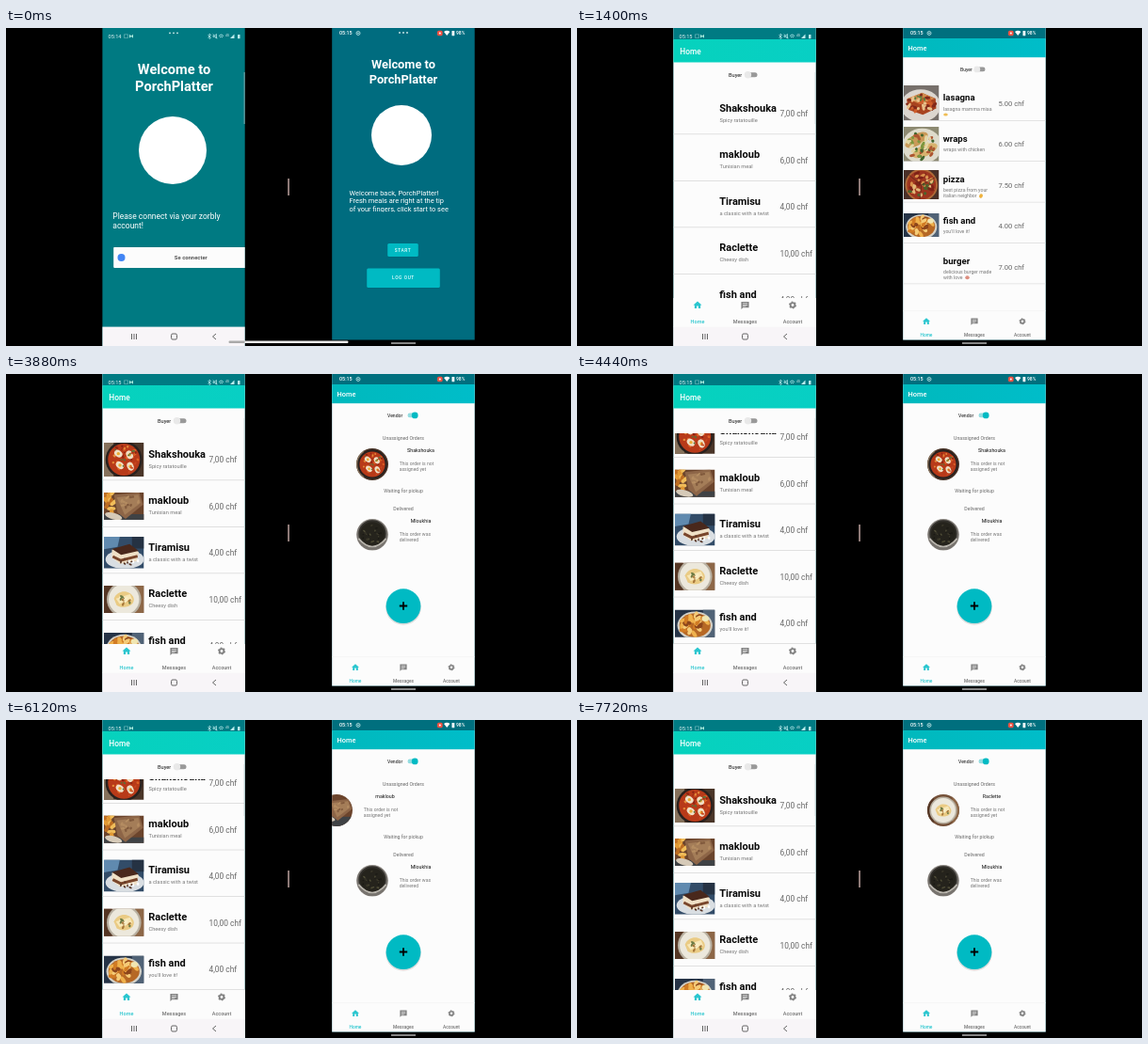
An HTML page for the animation above (8000 ms loop, 600 by 338 pixels).

```html
<!DOCTYPE html>
<html lang="en">
<head>
<meta charset="utf-8">
<title>Two phones</title>
<style>
  html, body { margin: 0; width: 100%; height: 100%; overflow: hidden; background: #000; }
  svg { display: block; width: 100vw; height: 100vh; font-family: Roboto, "Noto Sans", sans-serif; }
</style>
</head>
<body>
<svg id="stage" viewBox="0 0 600 338"></svg>
<script>
const LOOP = 8000;
const BOLD = 'font-weight="700"', MED = 'font-weight="500"', MID = 'text-anchor="middle"';

// y is the middle of the capitals
const text = (x, y, s, size, fill = '#fff', more = '') =>
  `<text x="${x}" y="${y + size * 0.355}" font-size="${size}" fill="${fill}" ${more}>${s}</text>`;
const rect = (x, y, w, h, fill, more = '') =>
  `<rect x="${x}" y="${y}" width="${w}" height="${h}" fill="${fill}" ${more}/>`;
const disc = (x, y, r, fill, more = '') =>
  `<circle cx="${x}" cy="${y}" r="${r}" fill="${fill}" ${more}/>`;
const oval = (x, y, rx, ry, fill, turn = 0) =>
  `<ellipse cx="${x}" cy="${y}" rx="${rx}" ry="${ry}" fill="${fill}" transform="rotate(${turn} ${x} ${y})"/>`;
const path = (d, fill, more = '') => `<path d="${d}" fill="${fill}" ${more}/>`;
const line = (d, color, w = 0.8) => path(d, 'none', `stroke="${color}" stroke-width="${w}"`);
const group = (id, body, more = '') => `<g id="${id}" ${more}>${body}</g>`;
const photo = (dish, x, y, w, h) =>
  `<use href="#${dish}" x="${x}" y="${y}" width="${w}" height="${h}"/>`;

let seed = 7;
const rnd = () => (seed = (seed * 16807) % 2147483647) / 2147483647;
function crumbs(n, x, y, rx, ry, colors, size = 4) {
  let s = '';
  for (let i = 0; i < n; i++) {
    const a = rnd() * 6.28, d = Math.sqrt(rnd());
    s += oval((x + Math.cos(a) * d * rx).toFixed(1), (y + Math.sin(a) * d * ry).toFixed(1),
      (size * (0.6 + rnd())).toFixed(1), (size * 0.7).toFixed(1), colors[i % colors.length], Math.round(rnd() * 180));
  }
  return s;
}

const dishes = {
  shakshouka: rect(0, 0, 100, 100, '#4a3528') + rect(0, 0, 24, 100, '#85715b') + disc(50, 50, 46, '#29211e') +
    disc(50, 50, 40, '#b83a19') + crumbs(26, 50, 50, 36, 36, ['#dd6225', '#8e2412', '#e58b39']) +
    [[36, 35], [64, 38], [40, 64], [66, 67]].map(([x, y]) => oval(x, y, 11, 8, '#f0dfc6', x) + disc(x, y, 4, '#edab33')).join('') +
    crumbs(14, 50, 50, 34, 34, ['#577238', '#c9481f'], 3),
  makloub: rect(0, 0, 100, 100, '#6b442c') + rect(0, 70, 100, 30, '#3f4245') + crumbs(18, 15, 40, 18, 30, ['#e29a35', '#f1bd5a', '#bd6d21'], 7) +
    path('M25 22L88 15L98 46L54 82L34 66Z', '#8d6547') + path('M32 28L86 21L92 42L52 72Z', '#a47d58') +
    crumbs(14, 64, 43, 25, 18, ['#815a3d', '#b58d62'], 4) + oval(24, 75, 22, 8, '#d6cab8', 15),
  tiramisu: rect(0, 0, 100, 100, '#324c68') + path('M0 10L42 0L34 36L0 42Z', '#608aaf') + rect(70, 0, 30, 40, '#253243') +
    oval(52, 67, 48, 24, '#d9dee2') + path('M20 43L64 32L87 49L82 72L40 78L20 63Z', '#efe0c6') +
    path('M20 41L64 29L87 46L43 56Z', '#49281c') + line('M22 60L42 70L84 59', '#79462c', 7) + crumbs(12, 62, 75, 30, 10, ['#573526', '#fff'], 3),
  raclette: rect(0, 0, 100, 100, '#745038') + rect(0, 0, 20, 100, '#543624') + rect(78, 0, 22, 100, '#8d6747') + disc(50, 50, 43, '#b8b0a1') +
    disc(50, 50, 38, '#ece8dc') + path('M25 48C36 24 66 27 74 46C80 65 52 76 32 65Z', '#eacb84') +
    path('M30 48L65 37L71 51L39 61Z', '#f7e7b7') + crumbs(11, 48, 56, 22, 13, ['#a7773a', '#f9efc9', '#6f7c45'], 4),
  fish: rect(0, 0, 100, 100, '#263447') + rect(70, 0, 30, 100, '#506276') + oval(50, 55, 44, 35, '#d5d2c8') + oval(50, 54, 39, 30, '#b66825') +
    crumbs(32, 48, 53, 35, 25, ['#efb14c', '#d17b24', '#f5cb77', '#8d451b'], 7) + oval(76, 38, 9, 7, '#f1e6b1'),
  lasagna: rect(0, 0, 100, 100, '#77706b') + oval(48, 58, 56, 46, '#dcd6cf') + path('M8 40L52 22L90 38L92 66L54 84L14 70Z', '#a8431f') +
    path('M10 38L52 21L88 38L46 54Z', '#d08a4c') + crumbs(36, 50, 54, 40, 25, ['#cf5d2b', '#82291a', '#e8c08a'], 6) + crumbs(5, 52, 36, 20, 8, ['#5e7c3a'], 4),
  wraps: rect(0, 0, 100, 100, '#8d8a72') + oval(52, 55, 56, 50, '#dedbcb') + oval(36, 38, 36, 16, '#c99a58', -30) +
    oval(60, 68, 38, 16, '#d8b26e', -25) + crumbs(40, 50, 53, 42, 38, ['#7c963e', '#e4d7a4', '#ad5631', '#43662e'], 6),
  pizza: rect(0, 0, 100, 100, '#4a3028') + disc(50, 51, 46, '#b06a38') + disc(50, 51, 41, '#9d351f') +
    crumbs(38, 50, 51, 36, 36, ['#d98f4a', '#7e2217', '#e2b778', '#4b632c'], 6) + line('M50 51L14 22M50 51L88 30M50 51L45 96', '#59281c', 2),
  burger: rect(0, 0, 100, 100, '#2c2423') + rect(0, 74, 100, 26, '#815735') + path('M22 43C26 9 76 9 80 43Z', '#ca7d32') +
    rect(20, 43, 62, 8, '#728b34') + rect(19, 49, 64, 12, '#4c251a') + rect(20, 59, 62, 5, '#e3a32e') + rect(23, 63, 56, 14, '#bd7637', 'rx="5"') +
    crumbs(10, 51, 29, 21, 8, ['#ecc883'], 2) + crumbs(12, 16, 71, 14, 12, ['#d89a3a'], 5),
  mloukhia: rect(0, 0, 100, 100, '#d3d0cc') + disc(50, 50, 49, '#77736e') + disc(50, 47, 43, '#302e29') + disc(50, 48, 38, '#25231c') +
    crumbs(24, 50, 49, 33, 31, ['#3e3b2c', '#191813', '#535039'], 3) + line('M7 62Q50 113 93 62', '#b9b5ad', 5)
};
const defs = '<defs>' + Object.entries(dishes).map(([id, body]) =>
  `<symbol id="${id}" viewBox="0 0 100 100" preserveAspectRatio="xMidYMid slice">${body}</symbol>`).join('') +
  [['paneL', 102.4, 0, 151.3, 338], ['paneR', 346.2, 0, 151.5, 331.6], ['listL', 102, 63, 152, 224], ['noteR', 346, 165, 152, 30.5]]
    .map(([id, ...b]) => `<clipPath id="${id}">${rect(...b, '#fff')}</clipPath>`).join('') +
  `<clipPath id="plate">${disc(389, 0, 17, '#fff')}</clipPath>` +
  ['barL,#06d2bd,#08cfc4', 'barR,#00b9bd,#00bdc9'].map(s => {
    const [id, a, b] = s.split(',');
    return `<linearGradient id="${id}"><stop stop-color="${a}"/><stop offset="1" stop-color="${b}"/></linearGradient>`;
  }).join('') + '</defs>';

function button(x, y, w, h, label, size, fill) {
  return rect(x, y + 0.6, w, h, '#00505a', 'rx="1.5" opacity=".2"') + rect(x + 0.2, y, w - 0.4, h, fill, 'rx="1.5"') +
    text(x + w / 2, y + h / 2, label, size, '#e6ffff', `${MID} ${MED} letter-spacing=".6"`);
}
const lines = (x, y, step, rows, size, fill, more) =>
  rows.map((s, i) => text(x, y + i * step, s, size, fill, more)).join('');
const dots = (id, x, y) => group(id, [-4, 0, 4].map(d => disc(x + d, y, 0.9, '#d5eeee')).join(''));

function navIcons(x, y, gap, k) {
  const home = path('M-5 0L0-4.5L5 0H3.5V4H1V1H-1V4H-3.5V0Z', '#2ac6cf');
  const chat = path('M-4.5-4H4.5V3H-2.5L-4.5 5Z', '#808080') + line('M-2.7-2H2.7M-2.7 0H2.7M-2.7 1.5H1', '#fff', 0.7);
  const gear = disc(0, 0, 2.6, 'none', 'stroke="#808080" stroke-width="2"') +
    disc(0, 0, 3.8, 'none', 'stroke="#808080" stroke-width="1.2" stroke-dasharray="1.9 2.08"');
  return [home, chat, gear].map((s, i) =>
    `<g transform="translate(${x + gap * i} ${y}) scale(${k})">${s}</g>`).join('');
}
const navLabels = (x, y, gap, size) => ['Home', 'Messages', 'Account'].map((s, i) =>
  text(x + gap * i, y, s, size, i ? '#707070' : '#2ac6cf', MID + ' ' + MED)).join('');

// Left phone
const loginL = lines(113.3, 199.7, 10, ['Please connect via your zorbly', 'account!'], 8.5) +
  rect(114.2, 232.9, 140, 22, '#fcfcfc', 'rx=".8"') + disc(122.5, 244, 4, '#4285f4') +
  text(196.3, 244, 'Se connecter', 5.9, '#555', MID + ' ' + BOLD);
const readyL = lines(113.3, 199.7, 10.1, ['Welcome back, nilo! Fresh meals', 'are right at the tip of your fingers,', 'click start to see them!'], 8.5) +
  button(170, 231, 38, 15, 'START', 5.4, '#08d2c3') + button(136, 261, 88, 23, 'LOG OUT', 5.4, '#08d2c3');
const menuL = [
  ['shakshouka', 'Shakshouka', 'Spicy ratatouille', '7,00 chf', 73, 36],
  ['makloub', 'makloub', 'Tunisian meal', '6,00 chf', 126, 29],
  ['tiramisu', 'Tiramisu', 'a classic with a twist', '4,00 chf', 173, 33.5],
  ['raclette', 'Raclette', 'Cheesy dish', '10,00 chf', 225, 29],
  ['fish', 'fish and', "you'll love it!", '4,00 chf', 275, 29]
];
const rowsL = menuL.map(([dish, name, sub, price, y, h], i) => {
  const top = i * 49.5;
  return group('photoL' + i, photo(dish, 104, y, 42.5, h)) + text(151.3, 84.7 + top, name, 11, '#080808', BOLD) +
    text(151.5, 97.5 + top, sub, 5.7, '#777') + text(215.5, 91.5 + top, price, 8.4, '#666') +
    rect(102, 112.5 + top, 152, 0.7, '#d4d4d4');
}).join('');
const homeL = rect(102, 0, 152, 338, '#fcfcfc') + rect(102, 0, 152, 12.5, '#007b83') + rect(102, 12, 152, 24.5, 'url(#barL)') +
  text(109.3, 25, 'Home', 8.3, '#fff', MED) + text(161, 50, 'Buyer', 5.7, '#111') +
  rect(180, 47.3, 11.5, 5, '#999', 'rx="2.5"') + disc(181.5, 49.8, 3.7, '#e9e9e9') +
  group('listBoxL', group('scrollL', rowsL), 'clip-path="url(#listL)"') +
  rect(102, 287, 152, 31, '#fcfcfc') + navIcons(128, 294.5, 50.5, 0.9) + navLabels(128, 311.7, 50.5, 5.5);
const iconsL = group('iconsL', line('M125.5 6.8H129.5V10.6H125.5Z', '#b8dcdc', 0.5) + path('M131 6.8L133 8.6L135 6.8V10.8L133 9L131 10.8Z', '#cfe') +
  line('M214.5 7.5L217.5 10.3L216 11.6V6L217.5 7.5L214.5 10.3M220 8H221.5L223.5 6.5V11L221.5 9.5H220ZM219.7 6.5L224.5 11', '#dff', 0.7) +
  line('M226 8.7Q228.5 5.5 231 8.7M227 10Q228.5 8 230 10', '#dff', 0.9) + text(233, 7.8, '4G', 3.3) +
  path('M238 11L242.5 6.5V11Z', '#dff') + rect(246, 7, 2.5, 4.2, '#dff', 'rx=".5"'), 'opacity=".85"');
const leftPhone = rect(102, 0, 152, 338, '#007a82') +
  lines(178.5, 44, 17.5, ['Welcome to', 'PorchPlatter'], 14.6, '#fff', MID + ' ' + BOLD) + disc(177, 130, 36, '#fff') +
  group('loginL', loginL) + group('readyL', readyL) +
  group('homeL', homeL) + disc(0, 0, 1, '#d9ffff', 'id="tapL"') +
  `<text id="clockL" x="108.5" y="10.6" font-size="5.6" fill="#e6f4f4"></text>` + iconsL + dots('dotsL', 178, 5.3) +
  rect(252.6, 47, 1.4, 55, '#b4c6c8', 'opacity=".65"') +
  rect(102, 317.6, 152, 20.4, '#f8f5f8') + line('M133.5 325V331M136 325V331M138.5 325V331M223 325L219.5 328L223 331', '#555', 0.9) +
  rect(175.5, 325, 6, 6, 'none', 'rx="1.5" stroke="#555" stroke-width=".9"');

// Right phone
const startR = rect(346, 0, 152, 332, '#006c7f') +
  lines(422, 38.5, 15.5, ['Welcome to', 'PorchPlatter'], 12.8, '#fff', MID + ' ' + BOLD) + disc(420, 114, 32, '#fff') +
  `<g clip-path="url(#noteR)">${lines(364.5, 175, 8.8, ['Welcome back, PorchPlatter!', 'Fresh meals are right at the tip', 'of your fingers, click start to see'], 7.45)}</g>` +
  button(405, 229, 33, 14, 'START', 4.8, '#00bac3') + button(383, 255.5, 78, 20.5, 'LOG OUT', 4.8, '#00bac3');
const menuR = [
  ['lasagna', 'lasagna', ['lasagna mamma miaa'], '5.00 chf', 61, 37],
  ['wraps', 'wraps', ['wraps with chicken'], '6.00 chf', 105, 37],
  ['pizza', 'pizza', ['best pizza from your', 'italian neighbor'], '7.50 chf', 151, 31],
  ['fish', 'fish and', ["you'll love it!"], '4.00 chf', 197, 25],
  ['burger', 'burger', ['delicious burger made', 'with love'], '7.00 chf', 239, 28]
];
const rowsR = menuR.map(([dish, name, sub, price, y, h], i) => {
  const top = i * 43.4;
  return group('photoR' + i, photo(dish, 347, y, 37.5, h)) + text(388.8, 74 + top, name, 9.6, '#080808', BOLD) +
    lines(389, 85.8 + top, 6, sub, 5.2, '#777') + text(447.5, 80.3 + top, price, 7.6, '#666') +
    rect(346, 98 + top, 152, 0.6, '#d4d4d4');
}).join('') + oval(391.5, 92, 2.3, 1.5, '#efbd55') + oval(429, 178.5, 1.8, 2.3, '#efb23e', 30) + oval(414.5, 265.3, 2.2, 2, '#dd8f80');

const order = (dish, name, y, note, id) =>
  group(id, `<g transform="translate(0 ${y})" clip-path="url(#plate)">${photo(dish, 372, -17, 34, 34)}</g>`) +
  text(440.5, y - 14.7, name, 5.3, '#111', MID) + lines(417.7, y - 0.8, 6, note, 5.1, '#777');
const PITCH = 190;
const waiting = [['shakshouka', 'Shakshouka'], ['makloub', 'makloub'], ['raclette', 'Raclette']].map(([dish, name], i) =>
  `<g transform="translate(${i * PITCH} 0)">${order(dish, name, 96, ['This order is not', 'assigned yet'], 'order' + i)}</g>`).join('');
const vendorR = [['Unassigned Orders', 68], ['Waiting for pickup', 124], ['Delivered', 143]]
  .map(([s, y]) => text(422, y, s, 5.2, '#666', MID)).join('') +
  group('orders', group('swipe', waiting) + order('mloukhia', 'Mloukhia', 170.8, ['This order was', 'delivered'], 'done')) +
  disc(422, 248, 18.8, '#000', 'opacity=".13"') + disc(422, 246.7, 18.4, '#00bac3') + line('M417.8 246.5H426.2M422 242.3V250.7', '#000', 1.8);
const homeR = rect(346, 0, 152, 332, '#fcfcfc') + rect(346, 0, 152, 11.5, '#006f7e') + rect(346, 11, 152, 20.2, 'url(#barR)') +
  text(351.5, 21.5, 'Home', 7.4, '#fff', MED) +
  `<text id="roleR" y="45.8" font-size="5.1" fill="#111"></text>` +
  group('switchR', rect(423.5, 41.6, 10, 4.6, '#999', 'id="trackR" rx="2.3"') + disc(0, 43.9, 3.4, '#e9e9e9', 'id="thumbR"')) +
  group('buyerR', rowsR) + group('vendorR', vendorR) +
  rect(346, 300.5, 152, 0.6, '#f2f2f2') + navIcons(371, 311.8, 51, 0.8) + navLabels(371, 326.4, 51, 4.8);
const iconsR = text(354, 5.5, '05:15', 5.4, '#fff', MED) + disc(374, 5.5, 2, 'none', 'stroke="#cee" stroke-width=".8"') + disc(374, 5.5, 0.8, '#cee') +
  rect(458, 2.7, 5.6, 5.6, '#ef5142', 'rx="1.5"') + disc(460.8, 5.5, 1, '#fff') +
  path('M465 4Q468.2 1.3 471.4 4L468.2 8Z', '#fff') + rect(473.5, 3, 2.8, 5.2, '#fff', 'rx=".5"') + text(478, 5.5, '98%', 5, '#fff', MED);
const rightPhone = group('startR', startR) + group('homeR', homeR) + disc(0, 0, 1, '#d9ffff', 'id="tapR"') + iconsR + dots('dotsR', 422, 5);

const stage = document.getElementById('stage');
stage.innerHTML = defs + rect(0, 0, 600, 338, '#000') +
  `<g clip-path="url(#paneL)">${leftPhone}</g><g clip-path="url(#paneR)">${rightPhone}</g>` +
  rect(299.4, 160, 1.3, 18, '#d8b9b5') + rect(409, 334.4, 26, 1.2, '#ddd') +
  group('handle', rect(236.5, 332.6, 127, 2.4, '#eee', 'rx="1.2"') + rect(236.5, 332.6, 17.2, 2.4, '#aaa', 'rx="1.2"'));

const parts = {};
stage.querySelectorAll('[id]').forEach(e => parts[e.id] = e);
const set = (id, attrs) => { for (const k in attrs) parts[id].setAttribute(k, attrs[k]); };
const fade = (id, v) => set(id, { opacity: v, visibility: v > 0 ? 'visible' : 'hidden' });
const move = (id, x, y) => set(id, { transform: `translate(${x} ${y})` });

// Smooth value from [time, value] steps
function at(t, steps) {
  if (t <= steps[0][0]) return steps[0][1];
  for (let i = 1; i < steps.length; i++) {
    const [a, u] = steps[i - 1], [b, v] = steps[i];
    if (t < b) { const p = (t - a) / (b - a); return u + (v - u) * p * p * (3 - 2 * p); }
  }
  return steps[steps.length - 1][1];
}
const ramp = (t, from, span) => at(t, [[from, 0], [from + span, 1]]);

function tap(id, t, taps) {
  const hit = taps.find(([start]) => t >= start && t < start + 240);
  if (!hit) return fade(id, 0);
  const p = (t - hit[0]) / 240;
  set(id, { cx: hit[1], cy: hit[2], r: 4 + 2 * p });
  fade(id, 0.5 * (1 - p * 0.6));
}

function draw(t) {
  ['handle', 'dotsL', 'dotsR'].forEach(id => fade(id, 1 - ramp(t, 320, 240)));
  parts.clockL.textContent = t < 400 ? '05:14' : '05:15';
  fade('loginL', t < 400 ? 1 : 0);
  fade('readyL', ramp(t, 400, 120));
  fade('homeL', ramp(t, 1040, 160));
  move('homeL', 0, 12 * (1 - ramp(t, 1040, 160)));
  fade('listBoxL', ramp(t, 1280, 120));
  for (let i = 0; i < 5; i++) fade('photoL' + i, ramp(t, 1440 + i * 140, 120));
  move('scrollL', 0, at(t, [[3960, 0], [4400, -24.3], [6880, -24.3], [7360, 0]]));
  tap('tapL', t, [[160, 196, 244], [760, 183.5, 237.5]]);

  const rise = ramp(t, 280, 160);
  fade('homeR', rise);
  move('homeR', 0, 12 * (1 - rise));
  const sold = ramp(t, 2680, 120);
  fade('buyerR', ramp(t, 460, 100) * (1 - sold));
  for (let i = 0; i < 5; i++) fade('photoR' + i, i < 4 ? ramp(t, 540 + i * 50, 100) : ramp(t, 1920, 120));
  fade('vendorR', sold);
  const vendor = t >= 2680;
  parts.roleR.textContent = vendor ? 'Vendor' : 'Buyer';
  set('roleR', { x: vendor ? 405 : 407 });
  move('switchR', vendor ? 3 : 0, 0);
  set('trackR', { fill: vendor ? '#93dce0' : '#999' });
  set('thumbR', { cx: 424.8 + 6.4 * sold, fill: vendor ? '#00bac3' : '#e9e9e9' });
  fade('orders', ramp(t, 3080, 120));
  ['order0', 'order1', 'order2', 'done'].forEach((id, i) => fade(id, ramp(t, 3240 + i * 120, 120)));
  move('swipe', at(t, [[5080, 0], [5360, -51], [5640, -PITCH], [5960, -PITCH], [6120, -PITCH - 38], [6480, -2 * PITCH]]), 0);
  tap('tapR', t, [[120, 422, 236], [2680, 430, 44]]);
}

const begin = performance.now();
function tick() {
  draw((performance.now() - begin) % LOOP);
  requestAnimationFrame(tick);
}
draw(0);
tick();
</script>
</body>
</html>
```
